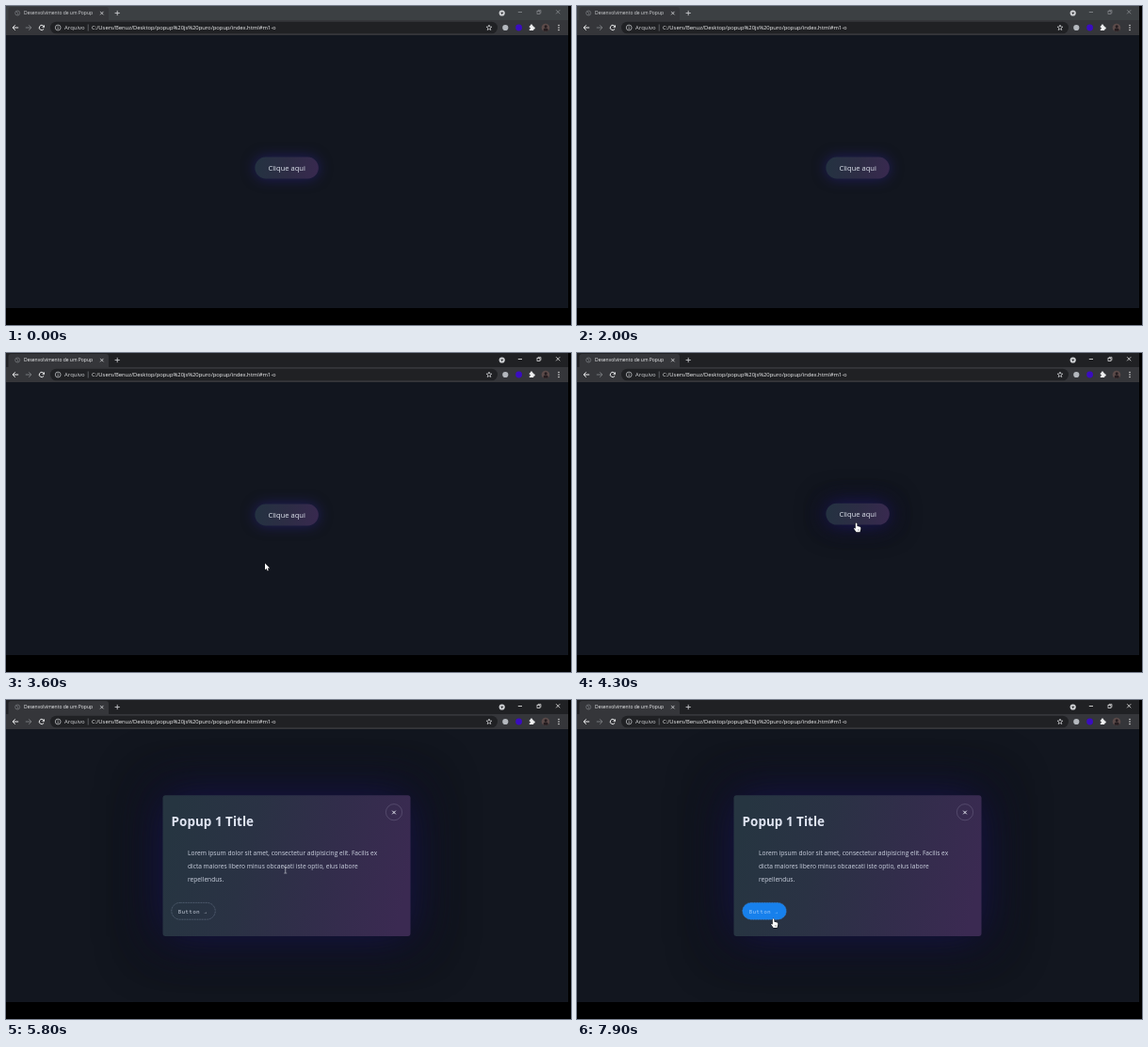
Animation of 600x339 px, one loop 8000 ms. Source, as an HTML page with a canvas:

```html
<!DOCTYPE html>
<html lang="pt">
<head>
<meta charset="utf-8">
<title>Popup</title>
<style>
html, body { margin: 0; width: 100%; height: 100%; overflow: hidden; background: #000; }
canvas { display: block; width: 100vw; height: 100vh; }
</style>
</head>
<body>
<canvas></canvas>
<script>
const W = 600, H = 339, LOOP = 8000, STEP = 100;
const SANS = '"Open Sans", "Noto Sans", sans-serif';
const MONO = '"Noto Sans Mono", "DejaVu Sans Mono", monospace';
const canvas = document.querySelector('canvas');
const ctx = canvas.getContext('2d');
let ratio = 1;

const clamp = v => Math.max(0, Math.min(1, v));
const ramp = (t, a, b) => clamp((t - a) / (b - a));
const mix = (a, b, k) => a + (b - a) * k;

function resize() {
  ratio = Math.max(1, innerWidth * devicePixelRatio / W);
  canvas.width = Math.round(W * ratio);
  canvas.height = Math.round(H * ratio);
}

// Drawn from a large font so that small sizes keep their exact advances.
function text(str, x, y, size, color, { font = SANS, weight = 400, spacing = 0 } = {}) {
  ctx.save();
  ctx.translate(x, y);
  ctx.scale(size / 100, size / 100);
  ctx.font = `${weight} 100px ${font}`;
  ctx.letterSpacing = `${spacing * 100 / size}px`;
  ctx.fillStyle = color;
  ctx.fillText(str, 0, 0);
  ctx.restore();
}

function rect(x, y, w, h, color) {
  ctx.fillStyle = color;
  ctx.fillRect(x, y, w, h);
}

function round(x, y, w, h, r) {
  ctx.beginPath();
  ctx.roundRect(x, y, w, h, r);
}

function fillRound(x, y, w, h, r, fill) {
  round(x, y, w, h, r);
  ctx.fillStyle = fill;
  ctx.fill();
}

function disc(x, y, r, color) {
  ctx.beginPath();
  ctx.arc(x, y, r, 0, 7);
  ctx.fillStyle = color;
  ctx.fill();
}

function ring(x, y, r, color, width) {
  ctx.beginPath();
  ctx.arc(x, y, r, 0, 7);
  ctx.strokeStyle = color;
  ctx.lineWidth = width;
  ctx.stroke();
}

function path(points, close) {
  ctx.beginPath();
  points.forEach(([x, y], i) => i ? ctx.lineTo(x, y) : ctx.moveTo(x, y));
  if (close) ctx.closePath();
}

function line(points, color, width) {
  path(points);
  ctx.strokeStyle = color;
  ctx.lineWidth = width;
  ctx.stroke();
}

function cross(x, y, r, color, width) {
  line([[x - r, y - r], [x + r, y + r]], color, width);
  line([[x - r, y + r], [x + r, y - r]], color, width);
}

function glow(x, y, w, h, r, spread, blur, color) {
  ctx.save();
  ctx.shadowColor = color;
  ctx.shadowBlur = blur * ratio;
  ctx.shadowOffsetX = 2000 * ratio;
  fillRound(x - spread - 2000, y - spread, w + 2 * spread, h + 2 * spread, r + spread, '#000');
  ctx.restore();
}

function blend(x0, y0, x1, y1, stops) {
  const g = ctx.createLinearGradient(x0, y0, x1, y1);
  stops.forEach((c, i) => g.addColorStop(i / (stops.length - 1), c));
  return g;
}

function drawTabs(active) {
  const dim = active ? '#f1f1f2' : '#8b8e92';
  rect(0, 0, 597, 16, active ? '#202124' : '#3c4043');
  fillRound(2.5, 1, 106.5, 18, 3, '#35363a');
  ring(12.2, 7.5, 2.5, '#74777b', 0.8);
  line([[10.6, 6], [13, 7.4], [12, 9.6]], '#74777b', 0.7);
  text('Desenvolvimento de um Popup', 19, 9.4, 4.98, active ? '#f0f1f3' : '#d3d5d8');
  cross(101.8, 7.6, 1.7, '#dcdde0', 0.8);
  line([[115.6, 7.5], [120.8, 7.5]], '#d6d8db', 0.8);
  line([[118.2, 4.9], [118.2, 10.1]], '#d6d8db', 0.8);
  disc(526.7, 7.5, 3.1, '#cfd1d4');
  path([[525.2, 6.8], [528.2, 6.8], [526.7, 8.9]], true);
  ctx.fillStyle = '#27282b';
  ctx.fill();
  line([[543.8, 6.5], [548, 6.5]], dim, 0.8);
  ctx.lineWidth = 0.7;
  ctx.strokeStyle = dim;
  ctx.strokeRect(564, 5.5, 3, 3);
  line([[565, 5], [565, 4.4], [568, 4.4], [568, 7.6], [567.4, 7.6]], dim, 0.6);
  cross(586.2, 6.3, 2, dim, 0.8);
}

function drawStar(x, y) {
  const pts = Array.from({ length: 10 }, (_, i) => {
    const a = i * Math.PI / 5 - Math.PI / 2, r = i % 2 ? 1.3 : 3;
    return [x + r * Math.cos(a), y + r * Math.sin(a)];
  });
  path(pts, true);
  ctx.strokeStyle = '#d8dadd';
  ctx.lineWidth = 0.7;
  ctx.stroke();
}

function drawToolbar() {
  rect(0, 15, 597, 16, '#35363a');
  fillRound(47, 16.7, 475, 12.6, 6.3, '#202124');
  line([[13.2, 23], [7.2, 23]], '#f0f1f2', 1);
  line([[9.8, 20.3], [7.1, 23], [9.8, 25.7]], '#f0f1f2', 1);
  line([[20.8, 23], [26.8, 23]], '#7d8084', 0.9);
  line([[24.2, 20.3], [26.9, 23], [24.2, 25.7]], '#7d8084', 0.9);
  ctx.beginPath();
  ctx.arc(37.9, 23, 2.6, 0.5, 5.5);
  ctx.strokeStyle = '#f0f1f2';
  ctx.lineWidth = 1;
  ctx.stroke();
  path([[41, 19.9], [41, 22.7], [38.2, 22.7]], true);
  ctx.fillStyle = '#f0f1f2';
  ctx.fill();
  ring(55.2, 23, 2.9, '#cfd1d4', 0.7);
  line([[55.2, 22.6], [55.2, 24.7]], '#cfd1d4', 0.8);
  line([[55.2, 21.2], [55.2, 21.9]], '#cfd1d4', 0.8);
  text('Arquivo', 62, 25.1, 6, '#d5d7da');
  rect(86.8, 19.5, 0.7, 7, '#75787c');
  text('C:/Users/Benuz/Desktop/popup%20js%20puro/popup/index.html#m1-o', 91, 25.1, 5.83, '#f2f3f4');
  drawStar(513, 23.1);
  disc(530.3, 23, 3.1, '#b4b8be');
  disc(544.6, 23, 3.4, '#3a0cc0');
  rect(555.8, 21.2, 4.4, 4.8, '#f0f1f2');
  disc(558, 20.8, 1.2, '#f0f1f2');
  disc(560.5, 23.5, 1.2, '#f0f1f2');
  disc(556, 23.7, 0.9, '#35363a');
  disc(573, 23, 4.3, '#5b4a49');
  disc(573.2, 21.7, 1.5, '#251d20');
  fillRound(570.7, 23.5, 5, 3.2, [2, 2, 1, 1], '#251d20');
  for (const y of [20.6, 23, 25.4]) disc(587, y, 0.75, '#e8e9ea');
}

function drawTrigger(hover, focus) {
  const y = 160.6 - hover * 0.9;
  const box = [264.4, y, 67.4, 22.8, 11.4];
  glow(...box, 8 * hover, mix(12, 24, hover), `rgba(9,10,18,${0.75 * hover})`);
  glow(...box, 1, mix(13, 21, hover), `rgba(44,36,138,${mix(0.5, 0.62, hover)})`);
  fillRound(...box, blend(265, y + 6, 331, y + 17, ['#243241', '#2d2d45', '#38294f']));
  if (focus) {
    ctx.globalAlpha = focus;
    round(262.6, y - 2.2, 71, 27.2, 13.6);
    ctx.strokeStyle = '#1758a4';
    ctx.lineWidth = 1;
    ctx.stroke();
    ctx.globalAlpha = 1;
  }
  text('Clique aqui', 278.4, y + 14.2, 7.57, '#dfe4ee');
}

function drawPopup(hover) {
  const box = [166.5, 101.3, 263, 149.8, 3];
  glow(...box, 18, 50, 'rgba(10,11,18,0.75)');
  glow(...box, 1, 50, 'rgba(34,29,116,0.6)');
  fillRound(...box, blend(172, 145, 424, 207, ['#263541', '#2a3244', '#322d4b', '#3b2a52']));
  text('Popup 1 Title', 175.6, 134.3, 13.5, '#e0e5f2', { weight: 700 });
  const lines = [
    'Lorem ipsum dolor sit amet, consectetur adipisicing elit. Facilis ex',
    'dicta maiores libero minus obcaecati iste optio, eius labore',
    'repellendus.'
  ];
  lines.forEach((s, i) => text(s, 193, 165.3 + 14.05 * i, 6.62, '#ccd2e0'));

  ring(412, 119.2, 8.6, 'rgba(170,165,195,0.35)', 0.7);
  cross(412, 119.5, 1.8, '#e6e8f2', 1);

  const button = [175.8, 215.4, 46.4, 17.8, 8.9];
  if (hover) {
    ctx.globalAlpha = hover;
    fillRound(...button, '#1780ec');
    ctx.globalAlpha = 1;
  }
  round(...button);
  ctx.setLineDash([1, 0.6]);
  ctx.strokeStyle = hover > 0.5 ? 'rgba(60,150,245,0.8)' : 'rgba(150,165,190,0.55)';
  ctx.lineWidth = 0.7;
  ctx.stroke();
  ctx.setLineDash([]);
  text('Button →', 182.8, 226.5, 5.5, hover > 0.5 ? 'rgba(200,225,255,0.8)' : '#ccd3e0',
    { font: MONO, weight: 500, spacing: 0.6 });
}

function drawArrow(x, y) {
  path([[0, 0], [0, 7], [1.6, 5.6], [2.7, 8], [3.8, 7.5], [2.8, 5.2], [5, 5.1]]
    .map(([a, b]) => [x + a, y + b]), true);
  ctx.fillStyle = '#fff';
  ctx.strokeStyle = '#0b0c10';
  ctx.lineWidth = 0.8;
  ctx.stroke();
  ctx.fill();
}

function drawHand(x, y) {
  ctx.save();
  ctx.translate(x, y);
  ctx.beginPath();
  ctx.moveTo(-0.8, 0.6);
  ctx.quadraticCurveTo(0, -0.8, 0.8, 0.6);
  ctx.lineTo(0.9, 3.4);
  ctx.lineTo(4, 4.2);
  ctx.quadraticCurveTo(5, 4.6, 4.7, 6.4);
  ctx.lineTo(3.9, 9.7);
  ctx.lineTo(0, 9.7);
  ctx.lineTo(-2.5, 6.2);
  ctx.quadraticCurveTo(-2.4, 4.9, -0.8, 6.1);
  ctx.closePath();
  ctx.strokeStyle = '#0b0c10';
  ctx.lineWidth = 1;
  ctx.stroke();
  ctx.fillStyle = '#fff';
  ctx.fill();
  for (const a of [1.7, 3]) line([[a, 6.6], [a, 8.6]], '#55585f', 0.4);
  ctx.restore();
}

function drawBeam(x, y) {
  const c = '#c3c6cf';
  line([[x, y - 3.2], [x, y + 3.2]], c, 0.7);
  for (const s of [-3.3, 3.3]) line([[x - 1.5, y + s], [x + 1.5, y + s]], c, 0.6);
}

// time, x, y of the pointer tip
const route = [
  [2600, 243, 317], [2800, 245, 290], [3100, 253, 265], [3400, 267, 240],
  [3800, 283, 207], [4100, 294, 185], [4300, 296.6, 180.6], [6200, 296.8, 180.8],
  [6500, 282, 190], [6800, 250, 213], [7100, 225, 229], [7400, 213, 232],
  [7900, 208.6, 232.4]
];

function pointer(t) {
  const i = route.findIndex(p => p[0] > t);
  if (i < 0) return route.at(-1).slice(1);
  const [a, b] = [route[i - 1], route[i]];
  const k = ramp(t, a[0], b[0]);
  return [mix(a[1], b[1], k), mix(a[2], b[2], k)];
}

function drawPointer(t) {
  if (t < 2600) return;
  const [x, y] = pointer(t);
  const onTrigger = t >= 4100 && t < 5000;
  const onText = t >= 5000 && y < 197;
  if (onTrigger || t >= 7200) drawHand(x, y);
  else if (onText) drawBeam(x, y);
  else drawArrow(x, y);
}

function draw(t) {
  ctx.setTransform(canvas.width / W, 0, 0, canvas.height / H, 0, 0);
  rect(0, 0, W, H, '#000');
  rect(0, 31, 597, 290, '#12161f');
  ctx.save();
  ctx.beginPath();
  ctx.rect(0, 31, 597, 290);
  ctx.clip();
  if (t < 5800) {
    drawTrigger(ramp(t, 4000, 4300), t < 4800 ? 0 : t < 4900 ? 0.6 : 1);
  } else {
    drawPopup(ramp(t, 7100, 7500));
  }
  drawPointer(t);
  ctx.restore();
  drawTabs(t >= 2100);
  drawToolbar();
}

function frame(now) {
  draw(Math.floor(now % LOOP / STEP) * STEP);
  requestAnimationFrame(frame);
}

addEventListener('resize', resize);
resize();
requestAnimationFrame(frame);
</script>
</body>
</html>
```
